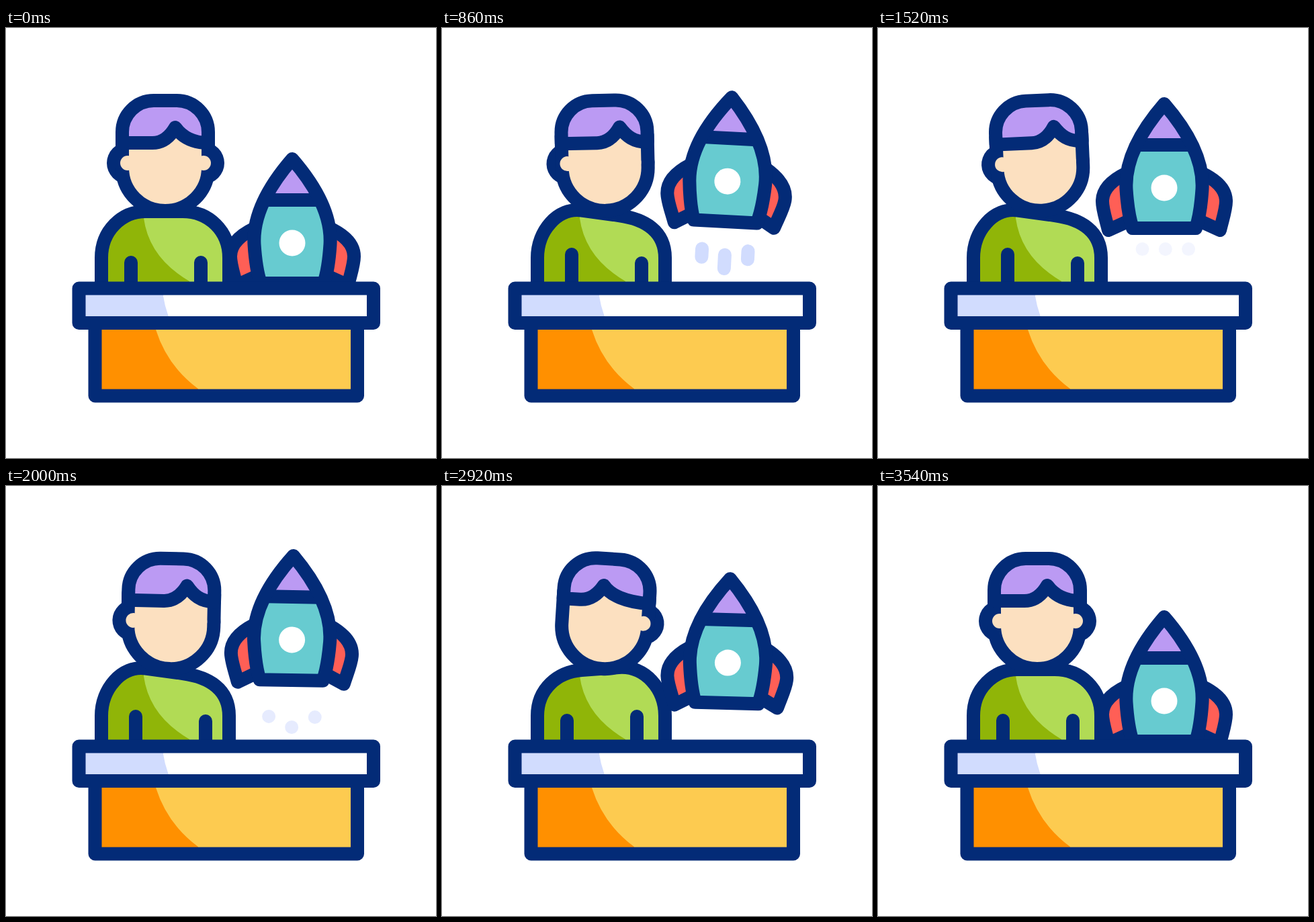
Animation, 640 px wide and 640 px high, one loop 3.6 s. Source, as an HTML page:

```html
<!DOCTYPE html>
<html lang="en">
<head>
<meta charset="utf-8">
<title>Rocket launch</title>
<style>
  html, body { margin: 0; width: 100%; height: 100%; overflow: hidden; background: #fff; }
  svg { display: block; width: 100vw; height: 100vh; }
  .line { stroke: #032b77; stroke-width: 20; stroke-linecap: round; stroke-linejoin: round; }
  .open { fill: none; }
  .navy { fill: #032b77; }
  .skin { fill: #fce0c0; }
  .smoke { stroke: #d1dcfe; stroke-width: 20; stroke-linecap: round; }
</style>
</head>
<body>
<svg viewBox="0 0 640 640">
  <defs>
    <path id="torso"/>
    <clipPath id="torsoClip"><use href="#torso"/></clipPath>
    <path id="hull" d="M426 195C393 233 367 276 369.5 322C371 345 374 365 379 380H473C478 365 481 345 482.500 322C485 276 459 233 426 195Z"/>
    <clipPath id="hullClip"><use href="#hull"/></clipPath>
    <path id="fin" class="line" fill="#ff5f56"
      d="M370 298C347 309 334 322 334 340C334 352 339 366 343 383L376 368"/>
  </defs>

  <g id="person">
    <use href="#torso" fill="#b1db55"/>
    <path clip-path="url(#torsoClip)" fill="#90b508" d="M130 260H204L205 283Q213 342 273 377V392H130Z"/>
    <use href="#torso" class="line open"/>
    <path id="armL" class="line open" d="M186 349V392"/>
    <path id="armR" class="line open" d="M290 349V392"/>
    <g id="head">
      <circle id="earL" class="navy" cx="181" cy="201" r="31"/>
      <circle id="earR" class="navy" cx="294" cy="201" r="31"/>
      <path class="line skin" d="M173 160V208A64 64 0 0 0 301 208V160"/>
      <circle id="lobeL" class="skin" cx="181" cy="201" r="11"/>
      <circle id="lobeR" class="skin" cx="294" cy="201" r="11"/>
      <path id="hair" class="line" fill="#bb9af3"/>
    </g>
  </g>

  <g id="rocket">
    <g id="smoke">
      <path class="smoke"/><path class="smoke"/><path class="smoke"/>
    </g>
    <use id="finL" href="#fin"/>
    <g transform="translate(852) scale(-1 1)"><use id="finR" href="#fin"/></g>
    <use href="#hull" fill="#67cbd0"/>
    <path clip-path="url(#hullClip)" fill="#bb9af3" d="M360 190H492V256H360Z"/>
    <path class="line" d="M386 256H466"/>
    <use href="#hull" class="line open"/>
    <circle cx="426" cy="320" r="19.5" fill="#fff"/>
  </g>

  <g id="desk">
    <path fill="#fdcb50" d="M132 439H523V547H132Z"/>
    <path fill="#ff9000" d="M132 439H219L223 449Q240 503 286 537V547H132Z"/>
    <path class="line open" d="M132.500 439V547.500H523V439"/>
    <path fill="#fff" d="M108 387H547V439H108Z"/>
    <path fill="#d1dcfe" d="M108 387H233Q234 412 246 439H108Z"/>
    <path class="line open" d="M108.500 387.500H547V439H108.500Z"/>
  </g>
</svg>
<script>
  const LOOP = 3600;
  const $ = id => document.getElementById(id);
  const set = (id, name, value) => $(id).setAttribute(name, value);

  // Progress of t through a..b: linear, eased both ways, eased out
  const ramp = (t, a, b) => Math.max(0, Math.min(1, (t - a) / (b - a)));
  const ease = (t, a, b) => (1 - Math.cos(Math.PI * ramp(t, a, b))) / 2;
  const easeOut = (t, a, b) => 1 - (1 - ramp(t, a, b)) ** 2;

  function drawTorso(t, right, left) {
    const l = 273 - 1.5 * right + left, r = 273 + 6 * right - 3 * left, s = (r - l) / 55;
    set('torso', 'd', `M142 392V342C142 302 172 ${l - 36 * s} 208 ${l}`
      + `L263 ${r}C302 ${r + 39 * s} 332 302 332 342V392`);
    const raise = 12 * (ease(t, 0, 500) - ease(t, 1700, 2300));
    set('armL', 'transform', `translate(${7 * right} ${-raise})`);
    set('armR', 'transform', `translate(${7 * right} ${right - 6 * left})`);
  }

  function drawHead(t, right, left) {
    const nod = -2.5 * ease(t, 200, 1520) + 2.6 * ease(t, 1520, 1900)
      + 3.5 * ramp(t, 1600, 2920) - 3.6 * ease(t, 2920, 3500);
    set('head', 'transform', `rotate(${nod} 238 270) translate(${7 * right + 1.3 * left})`);
    for (const part of ['ear', 'lobe']) {
      set(part + 'L', 'cx', 181 + 14 * left);
      set(part + 'R', 'cx', 294 - 14 * right);
    }
    const p = 252 + 8 * right - 20 * left;
    set('hair', 'd', 'M173 171V155A47 47 0 0 1 220 108H254A47 47 0 0 1 301 155V171'
      + `C${(p + 301) / 2} 171 ${p + 10} 162 ${p} 148`
      + `C${p - 7} 160 ${p - 17} 171 ${p - 34} 171Z`);
  }

  function drawRocket(t) {
    const sway = ease(t, 0, 860) - ease(t, 860, 1520);
    const boost = ease(t, 1640, 2570), land = ease(t, 2570, 3290);
    const lift = 105.5 * ease(t, 0, 480) - 23.5 * easeOut(t, 480, 1560) + 27.5 * boost - 109.5 * land;
    const tilt = 3 * (sway + boost - land), fold = 7 * sway + 10 * (boost - land);
    set('rocket', 'transform', `translate(0 ${-lift}) rotate(${tilt} 426 298)`);
    set('finL', 'transform', `rotate(${-0.7 * fold} 372 300)`);
    set('finR', 'transform', `rotate(${-fold} 372 300)`);
  }

  // Two puffs of three drops that grow, slide down and fade
  function drawSmoke(t) {
    const u = (t - (t < 1460 ? 600 : 1460)) / 600;
    set('smoke', 'opacity', Math.max(0, Math.min(1, u * 2.5, (1 - u) * 5.5)));
    [...$('smoke').children].forEach((drop, i) => {
      const range = i === 1 ? 39 : 23.5;
      const tail = 411 + range * ramp(u, 0.1, 0.8);
      const head = 411.01 + range * ramp(u, 0.1, 0.43);
      drop.setAttribute('d', `M${393.5 + 34.3 * i} ${tail}V${head}`);
    });
  }

  function frame() {
    const t = performance.now() % LOOP;
    const look = ease(t, 0, 500) - 2 * ease(t, 2000, 2500) + ease(t, 3000, 3450);
    const right = Math.max(look, 0), left = Math.max(-look, 0);
    drawTorso(t, right, left);
    drawHead(t, right, left);
    drawRocket(t);
    drawSmoke(t);
    requestAnimationFrame(frame);
  }
  frame();
</script>
</body>
</html>
```
